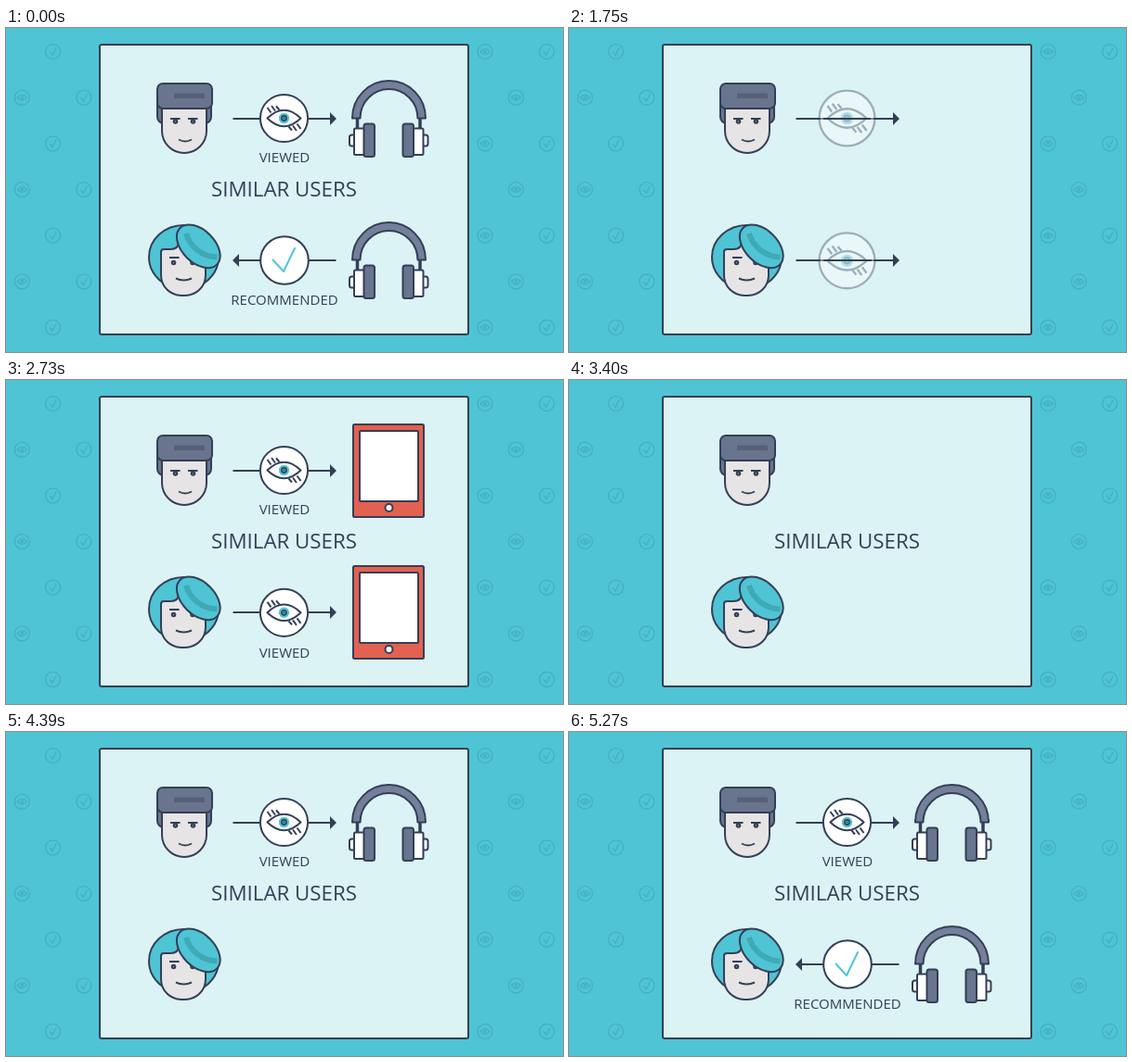
Write an HTML page that moves like this. It is 600 px wide and 350 px high and loops after 8770 ms.

```html
<!DOCTYPE html>
<html lang="en">
<head>
<meta charset="utf-8">
<title>Similar users</title>
<style>
html, body { margin: 0; height: 100%; overflow: hidden; background: #4fc4d4; }
svg { display: block; width: 600px; height: 350px; }
text { font: 500 15px "Open Sans", "Noto Sans", sans-serif; text-anchor: middle; fill: #343f57; stroke: none; }
#similar { font-size: 22.3px; }
.line { fill: none; }
.cyan { fill: #4fc4d4; }
.slate { fill: #69758e; }
.skin { fill: #e6e4e5; }
.white { fill: #fff; }
.dark { fill: #343f57; stroke: none; }
.round { stroke-linecap: round; stroke-linejoin: round; }
</style>
</head>
<body>
<svg viewBox="0 0 600 350" stroke="#343f57" stroke-width="2">
  <defs>
    <g id="bgEye" class="line">
      <circle r="8"/><path d="M-5 0Q0-6 5 0Q0 6-5 0Z"/><circle r="1.2"/>
    </g>
    <g id="bgCheck" class="line"><circle r="8"/><path d="M-3.5 0L-.5 4L3.5-4"/></g>

    <g id="eye">
      <circle r="25.6" class="white"/>
      <path class="line" stroke-linejoin="round" d="M-18 0Q0-17.5 18 0Q0 17.5-18 0Z"/>
      <circle r="5.7" class="cyan" stroke="none"/>
      <circle r="2.6" class="cyan" stroke-width="1.6"/>
      <circle r="1" class="dark"/>
      <path id="lashes" class="line" d="M-18-11.5L-14-6M-13.5-13.5L-9.5-8M-8.5-13L-5-9"/>
      <use href="#lashes" transform="rotate(180)"/>
    </g>
    <g id="check">
      <circle r="25.8" class="white"/>
      <path class="line round" stroke="#4fc4d4" d="M-12.5-.5L-1 12L11-13"/>
    </g>

    <g id="arrow">
      <path class="line" d="M244.500 98H274M325 98H350"/>
      <path class="dark" d="M349 91L356 98L349 105Z"/>
    </g>

    <g id="tablet">
      <rect x="374" y="48" width="76" height="100" rx="1.500" fill="#e26150"/>
      <rect x="381" y="55" width="63" height="76" rx="1" class="white"/>
      <circle cx="412.500" cy="138" r="4" class="white"/>
    </g>

    <g id="cup">
      <path stroke-width="3.500" d="M378.500 97V109"/>
      <rect x="370" y="115.500" width="7" height="12" rx="2.500" class="white"/>
      <rect x="375" y="108.500" width="12" height="28.500" rx="1.500" class="white"/>
      <rect x="385.500" y="103.500" width="11.500" height="35.500" rx="2.500" class="slate"/>
    </g>
    <g id="phones">
      <use href="#cup"/>
      <use href="#cup" transform="matrix(-1 0 0 1 824.500 0)"/>
      <path fill="#74809b" stroke-linejoin="round"
        d="M373 97.500A39.500 40.500 0 0 1 452 97.500H443.500A31 31.500 0 0 0 381.500 97.500Z"/>
    </g>
  </defs>

  <g id="pattern" stroke="#42afc0" stroke-width="1.200"></g>
  <rect x="101" y="18" width="397" height="313" rx="2" fill="#dcf3f5"/>

  <g id="man">
    <rect x="163" y="70" width="58" height="33" rx="7" class="slate"/>
    <path class="skin" d="M168 84H216V111A24 24 0 0 1 168 111Z"/>
    <rect x="163" y="60" width="59" height="27" rx="6" class="slate"/>
    <rect x="181" y="70.500" width="33" height="5.500" fill="#566179" stroke="none"/>
    <path class="line" d="M177 98H187.500M196 98H206.500M186 120.500Q193 124.500 200 120.500"/>
    <circle cx="182.500" cy="101" r="1.800" fill="#8b92a2"/>
    <circle cx="201.500" cy="101" r="1.800" fill="#8b92a2"/>
  </g>

  <g id="woman">
    <ellipse cx="191.500" cy="247.500" rx="37.500" ry="34.500" class="cyan"/>
    <path class="skin" stroke-linejoin="round"
      d="M167 242Q167 239 170 239H177Q186 239 186 231L215 250V267A22 22 0 0 1 193 289H189A22 22 0 0 1 167 267Z"/>
    <path class="line" d="M176 248H186.500M183 270.500Q191.500 274.500 200 270.500"/>
    <circle cx="180.500" cy="253.500" r="1.800" fill="#8b92a2"/>
    <circle cx="201" cy="253.500" r="1.800" fill="#8b92a2"/>
    <ellipse cx="207.300" cy="235.800" rx="28" ry="17.500" transform="rotate(45 207.300 235.800)" class="cyan"/>
    <path class="line" stroke="#3fa9b5" stroke-width="6" d="M194 222C198 236 211 247 227.500 247.500"/>
  </g>

  <use id="arrowTop" href="#arrow"/>
  <use id="arrowLow" href="#arrow" y="153"/>
  <use id="arrowBack" href="#arrow" transform="matrix(-1 0 0 1 600 153)"/>
  <use id="eyeTop" href="#eye"/>
  <use id="eyeLow" href="#eye"/>
  <use id="checkLow" href="#check"/>
  <path id="gapTop" d="M274 98H325"/>
  <path id="gapLow" d="M274 251H326"/>
  <use id="tabletTop" href="#tablet"/>
  <use id="tabletLow" href="#tablet" y="153"/>
  <use id="phonesTop" href="#phones"/>
  <use id="phonesLow" href="#phones" y="153"/>
  <text id="viewedTop" x="300" y="145">VIEWED</text>
  <text id="viewedLow" x="300" y="300">VIEWED</text>
  <text id="recommended" x="300" y="299">RECOMMENDED</text>
  <text id="similar" y="8.500">SIMILAR USERS</text>
</svg>
<script>
const LOOP = 8770, TICK = 30;
const $ = id => document.getElementById(id);

// Background icons: two staggered rows, one kind per column.
const kinds = { 0: "Eye", 1: "Check", 2: "Check", 15: "Eye", 16: "Eye", 17: "Check" };
$("pattern").innerHTML = Object.entries(kinds).map(([col, kind]) => {
  const shifted = col == 1 || col == 15 || col == 17;
  return Array.from({ length: shifted ? 4 : 3 }, (_, row) =>
    `<use href="#bg${kind}" x="${17.300 + 33.250 * col}" y="${(shifted ? 25.500 : 75.200) + 99.300 * row}"/>`).join("");
}).join("");

function show(id, alpha) {
  const el = $(id);
  el.style.display = alpha ? "" : "none";
  el.setAttribute("opacity", +alpha);
}

function zoom(id, p, x, y, extra) {
  show(id, p);
  $(id).setAttribute("transform", `translate(${x} ${y}) scale(${1 + extra * (1 - p)})`);
}

function draw(time) {
  const t = time < 1000 ? time + LOOP : time;
  const after = start => t >= start;
  const fade = (start, n) => Math.max(0, Math.min(n, Math.floor((t - start) / TICK) + 1)) / n;
  const first = t < 3400;

  const arrowTop = after(first ? 1430 : 3830);
  const arrowLow = first && after(1430);
  const arrowBack = after(4870);
  const eyeTop = fade(first ? 1690 : 3860, 8);
  const eyeLow = first ? eyeTop : 0;
  const check = fade(5030, 8);
  const tablet = first ? fade(2200, 4) : 0;

  show("arrowTop", arrowTop);
  show("arrowLow", arrowLow);
  show("arrowBack", arrowBack);
  zoom("eyeTop", eyeTop, 299.5, 97.5, .27);
  zoom("eyeLow", eyeLow, 299.5, 251.3, .27);
  zoom("checkLow", check, 300, 251, .27);
  show("gapTop", arrowTop && eyeTop < 1);
  show("gapLow", (arrowLow && eyeLow < 1) || (arrowBack && check < 1));
  show("tabletTop", tablet);
  show("tabletLow", tablet);
  show("phonesTop", fade(4300, 4));
  show("phonesLow", fade(4650, 4));
  show("viewedTop", after(first ? 1900 : 4070));
  show("viewedLow", first && after(1900));
  show("recommended", after(5270));
  zoom("similar", fade(2520, 8), 299.5, 173, .13);
}

const begin = performance.now();
function frame() {
  draw((performance.now() - begin) % LOOP);
  requestAnimationFrame(frame);
}
frame();
</script>
</body>
</html>
```
